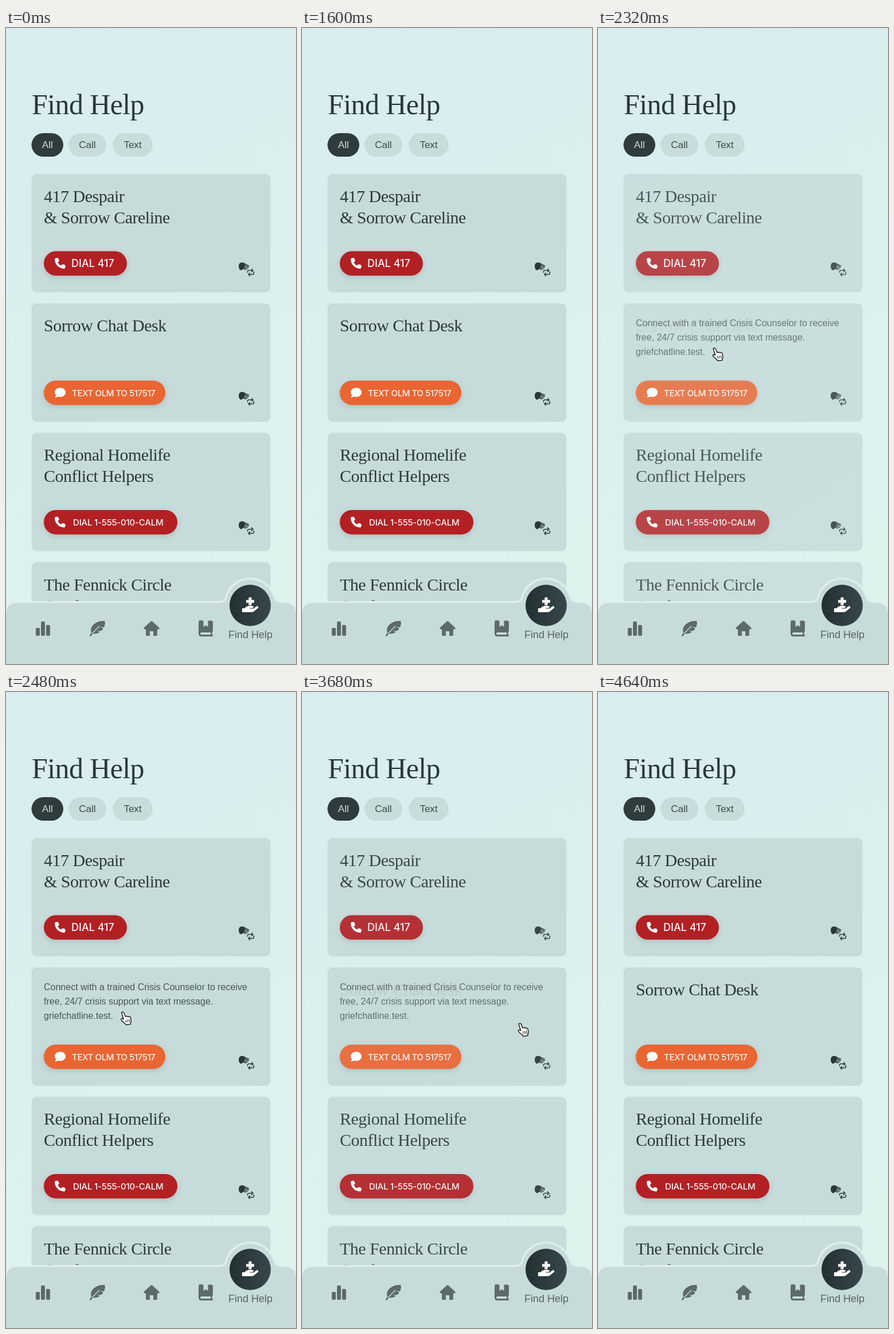
An HTML page that plays this animation: 506 by 1107 pixels, repeating every 4.72 s.

```html
<!DOCTYPE html>
<html lang="en">
<head>
<meta charset="utf-8">
<title>Find Help</title>
<style>
  html, body { margin: 0; width: 100%; height: 100%; overflow: hidden; }
  svg { display: block; width: 100vw; height: 100vh; }
  text { font: 17px "Liberation Sans", Arial, sans-serif; fill: #3c4a4c; }
  .heading { font: 50px "Liberation Serif", serif; letter-spacing: -.6px; fill: #2b393b; }
  .title { font: 30px "Liberation Serif", serif; letter-spacing: -.5px; fill: #2b393b; }
  .info { font-size: 16px; fill: #475557; }
  .action { font: 500 15px Inter, sans-serif; fill: #f8f4f4; }
  .button { filter: drop-shadow(0 3px 5px #0002); }
  .soft { fill: #c8dbdb; }
  .icon { fill: #5d6a6c; }
</style>
</head>
<body>
<svg viewBox="0 0 506 1107" preserveAspectRatio="none">
  <defs>
    <linearGradient id="sky" x1="0" y1="0" x2=".3" y2="1">
      <stop stop-color="#d9ecf0"/><stop offset=".5" stop-color="#dbefee"/><stop offset="1" stop-color="#def3ee"/>
    </linearGradient>
    <linearGradient id="dark" x2="1">
      <stop stop-color="#223032"/><stop offset="1" stop-color="#38474a"/>
    </linearGradient>
    <path id="phone" transform="scale(.037)" d="M165 25c-8-19-28-29-47-24l-88 24C12 30 0 46 0 64c0 247 201 448 448 448 18 0 34-12 39-30l24-88c5-19-5-39-24-47l-96-40c-16-7-35-2-46 12l-40 49C234 335 177 278 144 207l49-40c14-11 18-30 12-46z"/>
    <path id="bubble" d="M9.500 1C15 1 19 4.500 19 9s-4 8-9.500 8q-2 0-4-.7Q3 18 .3 18q1.700-2 1.800-4Q0 12 0 9c0-4.500 4-8 9.500-8z"/>
    <g id="flip" stroke="#29383a" fill="none" stroke-width="1.500" stroke-linecap="round">
      <path fill="#29383a" stroke="none" d="M0 8Q0 1 6 1l4 1 1 4-2 6-5 3Q0 13 0 8z"/>
      <path stroke-width="1.700" d="M8 2.500l9.500 4.500M9 5.500l8 4M9 8.500l6 3.500M8 11l4 2.500"/>
      <path d="M15.500 18.500V17q0-2 2-2H25m-2.500-2.500L25 15l-2.500 2.500M26.500 17.500V19q0 3-2 3H17m2.500-2.500L17 22l2.500 2.500"/>
    </g>
  </defs>

  <rect width="506" height="1107" fill="url(#sky)"/>
  <text class="heading" x="45" y="150">Find Help</text>
  <g id="chips"></g>
  <g id="list"><g id="front"></g><g id="back"></g></g>

  <path class="soft" stroke="#deeeed" stroke-width="3.500" d="M-2 1110V1022Q-2 999 22 999H371Q381 999 383 993A44 44 0 0 1 469 993Q471 999 481 999H484Q508 999 508 1022V1110z"/>
  <circle cx="426" cy="1005" r="36" fill="url(#dark)"/>
  <g fill="#fff">
    <path d="M423.500 991h5v4.500h4.500v5h-4.500v4.500h-5v-4.500H419v-5h4.500z"/>
    <path d="M412 1010h4l3-2.500q2-1.500 4-1.500h7q2 0 2 1.800t-2 1.800h-5v1h7l5-4q2-1 3 .3t-.5 2.800l-6 5q-2 2-4.500 2h-17z"/>
  </g>
  <text x="426.500" y="1062" text-anchor="middle" style="font-size:18px;fill:#566365">Find Help</text>
  <g class="icon">
    <rect x="52" y="1044" width="7" height="14" rx="2"/>
    <rect x="61" y="1033" width="7" height="25" rx="2"/>
    <rect x="70" y="1039" width="7" height="19" rx="2"/>
    <path d="M146 1057l3-4q-3-9 4-15 8-7 19-6 2 5-1 11h-7l6 2-3 4-8 .5 5 1.500q-5 4-12 3l-4 4.500q-1.500 1-2-1.500z"/>
    <path fill="none" stroke="#c8dbdb" stroke-width="1.500" d="M150 1054l13-13"/>
    <path d="M252.500 1033q1.500-1.200 3 0l12 11q1 2.500-1.500 2.500h-2V1056q0 2-2 2h-5v-8h-6v8h-5q-2 0-2-2v-9.500h-2q-2.500 0-1.500-2.500z"/>
    <path fill-rule="evenodd" d="M340 1031.500h4.500v11l4-3 4 3v-11h5.500q3 0 3 3v15q0 2-1.500 2.500v4h1.500v3h-20q-5 0-5-5v-18.500q0-5 4-5zM341 1052q-2 0-2 2t2 2h16v-4z"/>
  </g>

  <g id="cursor" stroke="#222" stroke-width="1.500" stroke-linejoin="round" stroke-linecap="round">
    <path fill="#fff" d="M-6.500-9q2-2 4 0l3 7q1.500-1.500 3 0 1.500-1.200 3 .3 2-.8 2.800 1l1 4.500q.5 3-1 5v2.500l-8 1-1.200-2q-4-2.500-7-6.500-1-3 2-2.500l2 1.200z"/>
    <path fill="none" stroke-width="1.100" d="M1 4l.8 4M4 3.500l.8 4M7 3l.6 4"/>
  </g>
</svg>

<script>
const LOOP = 4720, FLIP = 2165, RETURN = 3667, FADE = 300;
const RED = "#b22024", ORANGE = "#e96532";
const $ = id => document.getElementById(id);

const cards = [
  { title: ["417 Despair", "&amp; Sorrow Careline"], label: "DIAL 417", width: 145, color: RED, icon: "phone", x: 114, size: 18 },
  { title: ["Sorrow Chat Desk"], label: "TEXT OLM TO 517517", width: 212, color: ORANGE, icon: "bubble", x: 115, spacing: -.4,
    info: ["Connect with a trained Crisis Counselor to receive", "free, 24/7 crisis support via text message.", "griefchatline.test."] },
  { title: ["Regional Homelife", "Conflict Helpers"], label: "DIAL 1-555-010-CALM", width: 233, color: RED, icon: "phone", x: 117, spacing: -.2 },
  { title: ["The Fennick Circle", "Careline"] }
];

const lines = (rows, cls, y, step) =>
  rows.map((row, i) => `<text class="${cls}" x="66" y="${y + i * step}">${row}</text>`).join("");

function cardMarkup(card, i, flipped) {
  const content = flipped && card.info ? lines(card.info, "info", 40, 25) : lines(card.title, "title", 49, 37);
  const button = card.label ? `
    <rect class="button" x="66" y="134.5" width="${card.width}" height="42.5" rx="21" fill="${card.color}"/>
    <use href="#${card.icon}" x="85" y="146" fill="#fff"/>
    <text class="action" x="${card.x}" y="162" style="font-size:${card.size || 15}px;letter-spacing:${card.spacing || 0}px">${card.label}</text>
    <use href="#flip" x="406" y="153"/>` : "";
  return `<g transform="translate(0 ${254 + i * 225.2})">
    <rect class="soft" x="44.5" width="417" height="206" rx="9"/>${content}${button}</g>`;
}

$("front").innerHTML = cards.map((card, i) => cardMarkup(card, i, false)).join("");
$("back").innerHTML = cards.map((card, i) => cardMarkup(card, i, true)).join("");
$("chips").innerHTML = [["All", 44.5, 55.5], ["Call", 109, 66], ["Text", 186, 70]].map(([name, x, w], i) => `
  <rect x="${x}" y="183" width="${w}" height="41" rx="20.5" fill="${i ? "#c9dcdc" : "#2f3c3e"}"/>
  <text x="${x + w / 2}" y="209" text-anchor="middle" ${i ? "" : 'style="fill:#d3dfdf"'}>${name}</text>`).join("");

const progress = (t, start, length) => Math.min(1, Math.max(0, (t - start) / length));
const easeOut = p => 1 - (1 - p) ** 2;

function draw() {
  const t = performance.now() % LOOP;
  // The incoming side always dissolves in on top of the outgoing one.
  const returning = t >= RETURN;
  const shown = returning ? 1 - easeOut(progress(t, RETURN, FADE)) : easeOut(progress(t, FLIP, FADE));
  const top = $(returning ? "front" : "back");
  if ($("list").lastElementChild !== top) $("list").append(top);
  $("back").setAttribute("opacity", shown);
  $("front").setAttribute("opacity", 1 - shown);

  const glide = progress(t, 2680, 1160);
  $("cursor").setAttribute("transform", `translate(${207 + progress(t, 2160, 320) + 180 * easeOut(glide)} ${567 + 23 * glide})`);
  $("cursor").setAttribute("opacity", progress(t, 2040, 100) - progress(t, 3980, 140));
  requestAnimationFrame(draw);
}
draw();
</script>
</body>
</html>
```
